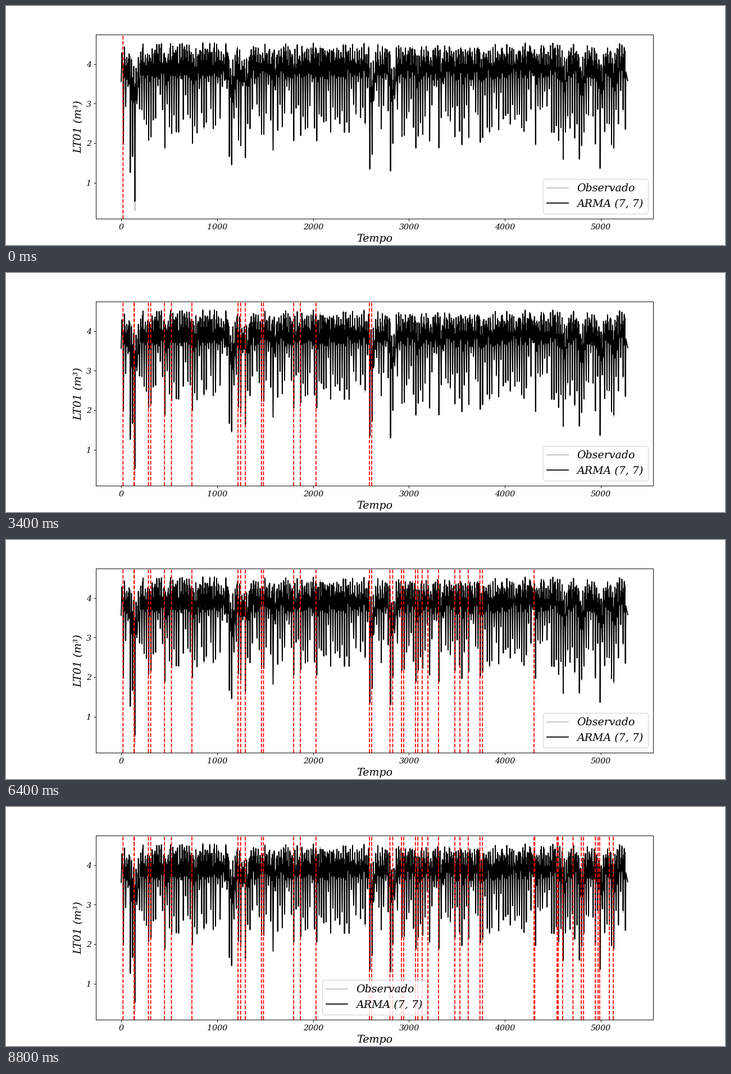
Write a matplotlib script that moves like this. It is 1280 px wide and 427 px high and loops after 9 s.

```python
import numpy as np
import matplotlib.pyplot as plt
from matplotlib.animation import FuncAnimation

DAYS, DAY, FIRST_DIP, LAST = 219, 24, 23, 5280
X_LIM = (-0.05 * LAST, 1.05 * LAST)
Y_LIM = (0.0885, 4.7415)

# Alarm times in days; one more appears at every step
ALARMS = np.array([
    0.8, 5.6, 5.7, 11.8, 12.8, 18.8, 21.8, 30.7, 50.7, 51.9, 53.9, 60.9,
    61.8, 74.9, 77.8, 84.6, 107.8, 108.8, 116.7, 117.9, 121.7, 122.7, 127.8,
    128.8, 130.7, 133.2, 137.8, 144.9, 147.1, 150.7, 155.8, 156.9, 179.3,
    179.6, 189.3, 189.8, 191.7, 196.2, 199.8, 200.8, 205.9, 207.1, 207.8,
    212.0, 213.7,
])

# The few days on which the tank nearly ran dry
DEEP = {3: 1.26, 4: 1.66, 5: 0.53, 46: 1.66, 47: 1.46, 53: 1.63, 65: 1.82,
        107: 1.35, 108: 1.72, 116: 1.3, 191: 1.59, 198: 1.6, 207: 1.36}


def daily_minima(rng):
    """Ordinary days dip moderately or hardly; alarm days dip low."""
    dips = rng.uniform(2.25, 3.0, DAYS)
    calm = rng.random(DAYS) < 0.22
    dips[calm] = rng.uniform(3.1, 3.7, calm.sum())
    days = np.unique(ALARMS.astype(int))
    dips[days] = rng.uniform(1.85, 2.3, len(days))
    dips[list(DEEP)] = list(DEEP.values())
    return dips


def level_series(rng, dips):
    """Sharp daily dips joined by a band of fast swings."""
    low = np.clip(2.2 - dips, 0, 0.9)
    sag = np.clip(np.convolve(low, [0.2, 0.7, 0.4])[1:-1], 0, 0.65)
    hours = np.arange(0, DAY, 3)
    crests, troughs = [2, 4, 6], [1, 3, 5, 7]

    knots = np.empty((DAYS, 8))
    knots[:, crests] = rng.uniform(3.95, 4.42, (DAYS, 3))
    knots[:, 4] = rng.uniform(4.2, 4.53, DAYS) + 0.4 * sag
    knots[:, troughs] = rng.uniform(3.62, 3.92, (DAYS, 4))
    knots -= sag[:, None]
    knots[:, 0] = dips

    times = FIRST_DIP + DAY * np.arange(DAYS)[:, None] + hours
    widen = rng.uniform(0, 1.5, (DAYS, 2))
    times = times.astype(float)
    times[:, 1] += widen[:, 0]
    times[:, 7] -= widen[:, 1]

    # Rise into the first day and fade out after the last dip
    t = np.concatenate([[0, 8, 14, 19], times.ravel()[:-7], [5260, 5270, LAST]])
    v = np.concatenate([[3.56, 4.28, 3.9, 3.9], knots.ravel()[:-7],
                        [3.8, 3.68, 3.58]])
    return t, v


rng = np.random.default_rng(7)
t, model = level_series(rng, daily_minima(rng))
observed = model + rng.normal(0, 0.025, len(t))
observed[np.argmin(model)] = 0.30

plt.rcParams.update({
    "font.family": "DejaVu Serif", "font.style": "italic", "font.size": 12,
    "axes.labelsize": 16, "legend.fontsize": 16, "text.hinting": "none",
})
fig, ax = plt.subplots(figsize=(15, 5.004), dpi=85.3334)
ax.plot(t, observed, color="silver", label="Observado")
ax.plot(t, model, color="black", label="ARMA (7, 7)")
ax.set(xlim=X_LIM, ylim=Y_LIM, xlabel="Tempo", ylabel="LT01 (m³)")
legend = ax.legend(loc="lower right")
alarms = [ax.axvline(DAY * day, color="red", ls="--", snap=False)
          for day in ALARMS]


def draw(i):
    for k, line in enumerate(alarms):
        line.set_visible(k <= i)
    # The legend gives way once its corner is the more crowded one
    legend.set_loc("lower center" if i >= 43 else "lower right")
    return [*alarms, legend]


anim = FuncAnimation(fig, draw, frames=len(ALARMS), interval=200, repeat=True)
plt.show()
```
